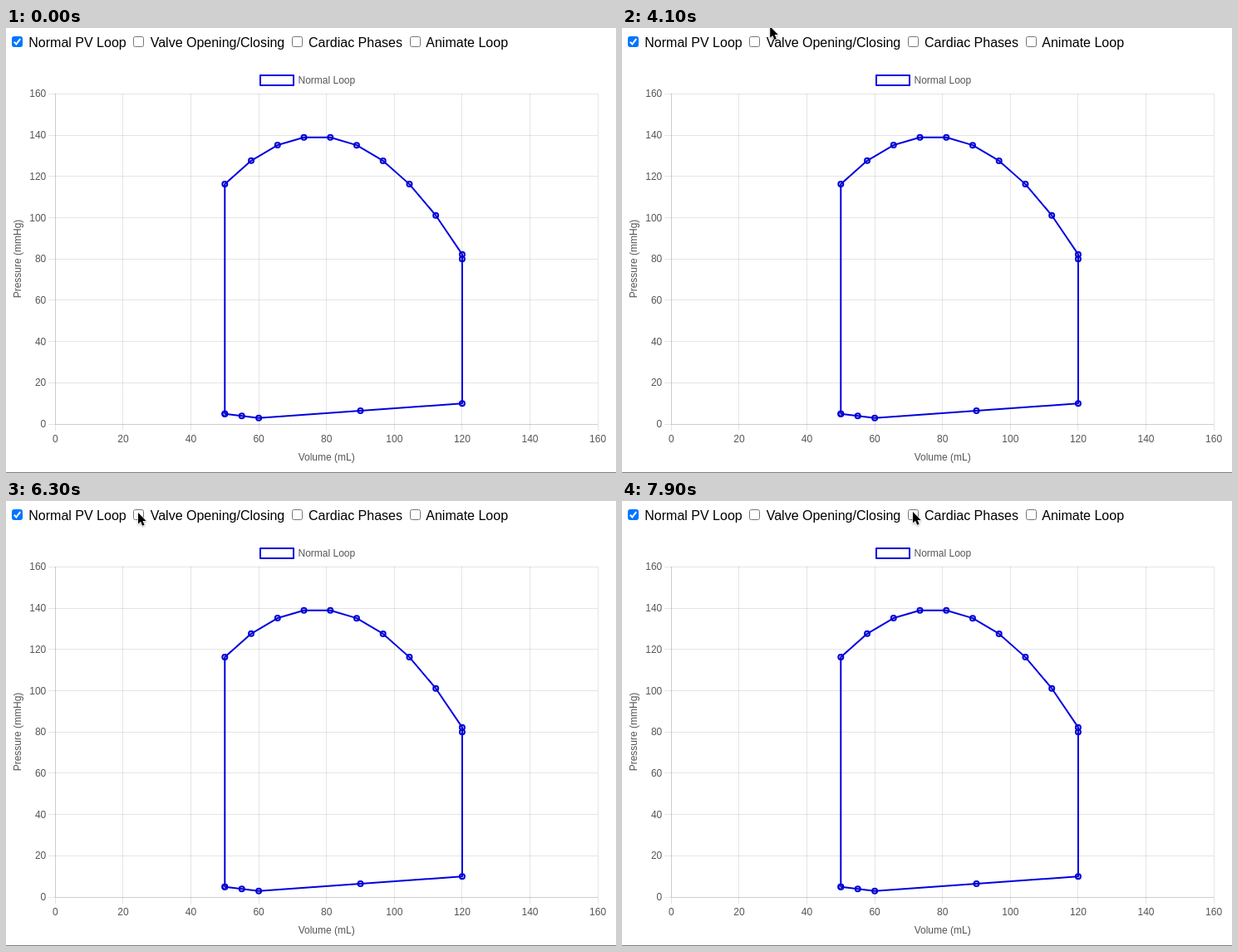
An HTML page for the animation above (8 s loop, 734 by 536 pixels).

```html
<!DOCTYPE html>
<html lang="en">
<head>
<meta charset="utf-8">
<title>PV loop</title>
<style>
  html, body { margin: 0; width: 100%; height: 100%; overflow: hidden; background: #fff; }
  svg { display: block; font: 12px "Liberation Sans", Arial, sans-serif; fill: #555; }
  .controls { font-size: 16px; fill: #000; }
  .grid { stroke: #000; stroke-opacity: .1; }
  .loop { stroke: #0000de; stroke-width: 2; fill: none; stroke-linejoin: round; }
  .loop circle { fill: rgba(0, 0, 0, .1); }
</style>
</head>
<body>
<svg id="stage" width="734" height="536" viewBox="0 0 734 536"></svg>
<script>
const stage = document.getElementById('stage');

function add(parent, tag, attrs, text) {
  const node = document.createElementNS('http://www.w3.org/2000/svg', tag);
  for (const name in attrs) node.setAttribute(name, attrs[name]);
  if (text !== undefined) node.textContent = text;
  return parent.appendChild(node);
}

const px = volume => 59.3 + volume * 4.08;
const py = pressure => 477.1 - pressure * 2.486;
const crisp = v => Math.floor(v) + 0.5;

// Checkbox row
const controls = add(stage, 'g', { class: 'controls' });
[['Normal PV Loop', 7, 27.3, true], ['Valve Opening/Closing', 153, 173.7],
 ['Cardiac Phases', 344, 364], ['Animate Loop', 486, 505.3]].forEach(([label, boxX, textX, checked]) => {
  add(controls, 'rect', {
    x: boxX + 0.5, y: 10.5, width: 12, height: 12, rx: 2,
    fill: checked ? '#0075ff' : '#fff', stroke: checked ? '#0075ff' : '#767676'
  });
  if (checked) {
    add(controls, 'path', {
      d: `M${boxX + 2.8} 16.8l2.6 2.6 4.8-6.2`, fill: 'none', stroke: '#fff', 'stroke-width': 2
    });
  }
  add(controls, 'text', { x: textX, y: 23 }, label);
});

// Grid, ticks and axis labels
const grid = add(stage, 'g', { class: 'grid' });
for (let value = 0; value <= 160; value += 20) {
  const x = crisp(px(value)), y = crisp(py(value));
  add(grid, 'path', { d: `M${x} 79V485M51 ${y}H712` });
  add(stage, 'text', { x: px(value), y: 499, 'text-anchor': 'middle' }, value);
  add(stage, 'text', { x: 48.3, y: py(value) + 4, 'text-anchor': 'end' }, value);
}
add(grid, 'path', { d: 'M59.5 79V477M59 477.5H712' });
add(stage, 'text', { x: 385.7, y: 521, 'text-anchor': 'middle' }, 'Volume (mL)');
add(stage, 'text', { transform: 'translate(18 278) rotate(-90)', 'text-anchor': 'middle' }, 'Pressure (mmHg)');
add(stage, 'path', { d: 'M0 535.5H734', stroke: '#808080' });

// Ejection follows a parabola; the other phases are straight
const points = [[50, 5], [55, 4], [60, 3], [90, 6.5], [120, 10], [120, 80]];
for (let i = 9; i >= 0; i--) {
  const volume = 50 + i * 70 / 9;
  points.push([volume, 139.4 - 0.0312 * (volume - 77.2) ** 2]);
}
points.push([50, 5]);

const loop = add(stage, 'g', { class: 'loop' });
add(loop, 'rect', { x: 306, y: 57, width: 40, height: 12 });
add(stage, 'text', { x: 351.5, y: 67 }, 'Normal Loop');
add(loop, 'polyline', { points: points.map(([v, p]) => [px(v), py(p)]).join(' ') });
points.forEach(([v, p]) => add(loop, 'circle', { cx: px(v), cy: py(p), r: 3 }));

const cursor = add(stage, 'path', {
  d: 'M0 0V13.6L3.1 10.8 5.2 15.7 7.6 14.7 5.5 9.9H9.6Z',
  fill: '#000', stroke: '#fff', 'stroke-width': 1.2, 'paint-order': 'stroke',
  style: 'filter: drop-shadow(0 1px 1px rgba(0, 0, 0, .3))'
});

// Pointer stops: time in ms, x, y
const stops = [
  [0, 196, -24], [3700, 196, -24], [4300, 172, 6], [4800, 167, 14], [5200, 167, 14],
  [5700, 159, 14], [6700, 159, 14], [7200, 324, -4], [7700, 350, 13], [8000, 350, 13]
];

function pointerAt(time) {
  const next = stops.findIndex(stop => stop[0] > time);
  const [t0, x0, y0] = stops[next - 1], [t1, x1, y1] = stops[next];
  const u = (time - t0) / (t1 - t0), eased = u * u * (3 - 2 * u);
  return [x0 + (x1 - x0) * eased, y0 + (y1 - y0) * eased];
}

function draw() {
  const time = Math.floor(performance.now() % 8000 / 100) * 100;
  cursor.setAttribute('transform', `translate(${pointerAt(time)})`);
  requestAnimationFrame(draw);
}
draw();
</script>
</body>
</html>
```
